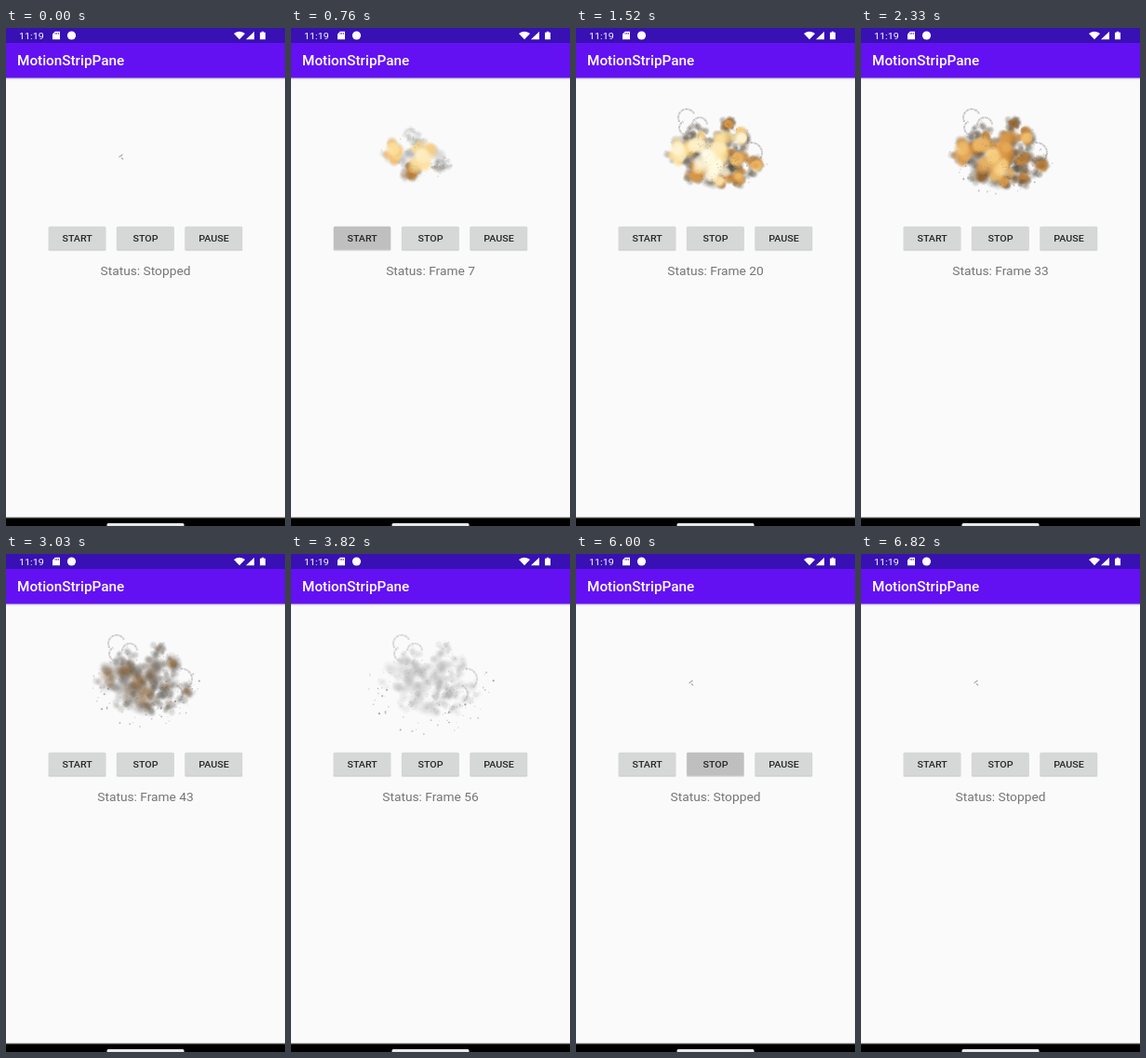
Recreate the animation shown at these times as an HTML page with a canvas. Size 300 px wide and 534 px high, loop 7.18 s.

```html
<!DOCTYPE html>
<html lang="en">
<head>
<meta charset="utf-8">
<title>Sprite demo</title>
<style>
  html, body { margin: 0; width: 100%; height: 100%; overflow: hidden; background: #fafafa; }
  svg, canvas { position: absolute; left: 0; top: 0; width: 300px; height: 534px; display: block; }
  canvas { height: 210px; }
  text { font-family: Roboto, Arial, sans-serif; }
  .clock { font-size: 9.8px; fill: #fff; }
  .title { font-size: 13.9px; font-weight: 500; fill: #fff; }
  .label { font-size: 9.7px; font-weight: 500; fill: #242424; text-anchor: middle; }
  .status { font-size: 12.5px; fill: #757575; text-anchor: middle; }
  .button rect { rx: 1.3px; }
</style>
</head>
<body>
<svg viewBox="0 0 300 534">
  <defs>
    <linearGradient id="shade" x2="0" y2="1">
      <stop offset="0" stop-color="#000" stop-opacity=".22"/>
      <stop offset="1" stop-color="#000" stop-opacity="0"/>
    </linearGradient>
  </defs>
  <rect width="300" height="534" fill="#fafafa"/>
  <rect y="53" width="300" height="3" fill="url(#shade)"/>
  <rect width="300" height="53.5" fill="#6311f3"/>
  <rect width="300" height="16" fill="#3810b4"/>

  <!-- the screen is slightly wider than its natural aspect -->
  <text class="clock" transform="translate(14 11.7) scale(1.1 1)">11:19</text>
  <text class="title" transform="translate(12 40.3) scale(1.1 1)">MotionStripPane</text>

  <g fill="#fff">
    <path d="M52.7 3.8H58V12.2H50V6.4Z"/>
    <circle cx="70.5" cy="8" r="4.6"/>
    <path d="M245 6Q251 1.6 257 6L251 12.3Z"/>
    <path d="M267 3.7V12.2H258Z"/>
    <path d="M273 4.7H274.8V3.7H277.2V4.7H279V12.3H273Z"/>
  </g>
  <path d="M53 5V6.8M54.7 5V6.8M56.4 5V6.8" stroke="#3810b4" stroke-width=".7"/>

  <g id="buttons"></g>
  <text id="status" class="status" transform="translate(150 265) scale(1.1 1)">Status: Stopped</text>

  <rect y="524" width="300" height="1.5" fill="#bdbdbd"/>
  <rect y="525.3" width="300" height="9" fill="#000"/>
  <rect x="108.5" y="531" width="83" height="4" rx="1.5" fill="#e8e8e8"/>
</svg>
<canvas></canvas>

<script>
const LOOP = 7180, START = 340, STOP = 5915;
const TIMELINE = [[START, 0], [745, 7], [1512, 20], [2322, 33], [3812, 56], [3942, 58.2]];

// label, left edge, press time, fade start, fade end
const BUTTONS = [
  ['START', 46, 210, 850, 1090],
  ['STOP', 119.3, 5150, 6450, 6810],
  ['PAUSE', 192.8, 3840, 4480, 4730]
];

// x, y, radius, birth, heat
const BLOBS = [
  [110, 132, 14, 0, .88], [142, 138, 18, 0, 1], [129, 155, 12, 1, .58],
  [130, 124, 15, 7, .85], [150, 151, 17, 7, 1], [158, 128, 16, 8, .85],
  [178, 118, 11, 9, .86], [165, 103, 8, 10, .5], [193, 147, 10, 10, .6],
  [175, 160, 10, 9, .6], [156, 163, 9, 8, .62], [172, 141, 12, 7, .62],
  [131, 112, 10, 2, .05], [160, 151, 8, 1, .15], [172, 145, 8, 2, 0]
];

// x, y, radius, first angle, sweep
const CURLS = [
  [119, 96, 9, 2.6, 3.2], [133, 104, 8, 3.2, 3], [189, 134, 11, 4.6, 2.6],
  [118, 107, 7, 1.8, 2.6], [181, 150, 9, 5, 2.4]
];

const HEAT = [[0, .7], [7, .93], [14, 1.1], [20, 1.1], [33, .76], [40, .5], [48, 0]];
const SMOKE = [[0, .1], [7, .2], [20, .4], [33, .36], [45, .24], [56, .13], [64, .07]];
const TONE = [[0, 115], [7, 112], [20, 72], [33, 74], [45, 95], [56, 122]];
const FIRE = [
  [0, [74, 62, 48]], [.3, [136, 90, 42]], [.52, [220, 150, 66]],
  [.76, [253, 218, 140]], [1, [255, 251, 228]]
];

const clamp = v => Math.max(0, Math.min(1, v));
const mix = (a, b, p) => a + (b - a) * p;

function segment(keys, v) {
  let i = 0;
  while (i < keys.length - 2 && v >= keys[i + 1][0]) i++;
  const [from, a] = keys[i], [to, b] = keys[i + 1];
  return [a, b, clamp((v - from) / (to - from))];
}
const at = (keys, v) => mix(...segment(keys, v));
function fireColor(heat) {
  const [a, b, p] = segment(FIRE, heat);
  return a.map((v, i) => Math.round(mix(v, b[i], p)));
}

let seed = 2417;
function rand(lo = 0, hi = 1) {
  seed = (seed * 16807) % 2147483647;
  return lo + (hi - lo) * seed / 2147483647;
}
const many = (n, make) => Array.from({ length: n }, make);

const puffs = (n, near, far, small, large) => BLOBS.flatMap(blob => many(n, () => ({
  blob, turn: rand(0, Math.PI * 2), dist: rand(near, far),
  size: rand(small, large), vary: rand(-1, 1)
})));
const smoke = puffs(14, .3, 1.08, .2, .45);
const flames = puffs(11, 0, .82, .28, .58)
  .filter(p => p.blob[4] > .1)
  .sort((a, b) => (a.blob[4] - a.dist * .4) - (b.blob[4] - b.dist * .4));
const specks = puffs(16, .2, 1.25, .4, .9);
const debris = many(50, () => ({
  turn: rand(-.25, 3.45), far: rand(.68, 1.12), size: rand(.4, 1.2), shade: rand(.2, .6)
}));

const canvas = document.querySelector('canvas');
const ctx = canvas.getContext('2d');
const dpr = window.devicePixelRatio || 1;
canvas.width = 300 * dpr;
canvas.height = 210 * dpr;
ctx.scale(dpr, dpr);

function soft(x, y, r, [red, green, blue], alpha, core = .35) {
  const g = ctx.createRadialGradient(x, y, 0, x, y, r);
  const rgb = `${red},${green},${blue}`;
  g.addColorStop(0, `rgba(${rgb},${alpha})`);
  g.addColorStop(core, `rgba(${rgb},${alpha * .85})`);
  g.addColorStop(1, `rgba(${rgb},0)`);
  ctx.fillStyle = g;
  ctx.fillRect(x - r, y - r, r * 2, r * 2);
}

function dot(x, y, r, tone, alpha) {
  ctx.fillStyle = `rgba(${tone},${tone},${tone},${alpha})`;
  ctx.beginPath();
  ctx.arc(x, y, r, 0, 7);
  ctx.fill();
}

function place(p, n) {
  const [bx, by, br, birth] = p.blob;
  const age = clamp((n - birth) / 9);
  const grow = 1 - (1 - age) ** 2;
  const spread = 1 + Math.max(0, n - 20) * .001;
  const cx = 150 + (mix(128, bx, Math.sqrt(grow)) - 150) * spread;
  const cy = 135 + (mix(138, by, Math.sqrt(grow)) - 135) * spread;
  const r = br * grow * spread;
  const turn = p.turn + n * .008 * p.vary;
  return {
    x: cx + Math.cos(turn) * r * p.dist,
    y: cy + Math.sin(turn) * r * p.dist,
    r, grow
  };
}

function drawSpot() {
  ctx.strokeStyle = 'rgba(110,110,110,.55)';
  ctx.lineWidth = 1.2;
  ctx.beginPath();
  ctx.moveTo(121.5, 138.5);
  ctx.lineTo(125.5, 135.5);
  ctx.moveTo(124, 139);
  ctx.lineTo(126, 141);
  ctx.stroke();
}

function drawDebris(n) {
  const p = Math.sqrt(clamp((n - 8) / 48));
  const show = clamp((n - 14) / 22);
  for (const d of debris) {
    const x = 150 + Math.cos(d.turn) * 62 * d.far * p;
    const y = 138 + Math.sin(d.turn) * 51 * d.far * p;
    dot(x, y, d.size, 105, d.shade * show);
  }
}

function drawCurls(n, tone) {
  const alpha = .3 * clamp((n - 7) / 10);
  ctx.lineWidth = 2;
  ctx.setLineDash([2.2, .7, 1.1, .5]);
  ctx.strokeStyle = `rgba(${tone},${tone},${tone},${alpha})`;
  for (const [x, y, r, from, sweep] of CURLS) {
    ctx.beginPath();
    ctx.arc(x, y, r, from, from + sweep);
    ctx.stroke();
  }
  ctx.setLineDash([]);
}

function drawBlast(n) {
  ctx.clearRect(0, 0, 300, 210);
  if (n < 1) return drawSpot();

  const tone = at(TONE, n), density = at(SMOKE, n), heat = at(HEAT, n);
  const warm = clamp(heat) * clamp((n - 6) / 10);
  drawDebris(n);
  drawCurls(n, tone);

  for (const p of smoke) {
    const { x, y, r, grow } = place(p, n);
    if (!grow) continue;
    const c = tone + p.vary * 16;
    const rgb = [c + warm * 12, c + warm * 2, c - warm * 14].map(Math.round);
    const thick = 1.35 - Math.hypot(x - 152, y - 130) / 75;
    soft(x, y, r * p.size + 1.2, rgb, density * thick * grow, .4);
  }

  if (heat > 0) for (const p of flames) {
    const { x, y, r, grow } = place(p, n);
    const h = heat * p.blob[4] - p.dist * .3 + p.vary * .1;
    if (!grow || h < .05) continue;
    const alpha = clamp(h * 2) * .8 * grow * clamp(heat * 2);
    soft(x, y, r * p.size + 1, fireColor(h), alpha, .5);
  }

  const grain = mix(.26, .18, clamp((n - 20) / 36));
  for (const p of specks) {
    const { x, y, grow } = place(p, n);
    if (!grow || (p.dist < .75 && heat * p.blob[4] > .55)) continue;
    dot(x, y, p.size * .9, Math.round(tone * .8), grain * grow);
  }
}

const overlays = [];
document.getElementById('buttons').innerHTML = BUTTONS.map(([label, x]) => `
  <g class="button">
    <rect x="${x - .7}" y="213.2" width="62.4" height="26" fill="#000" opacity=".07"/>
    <rect x="${x - .2}" y="213" width="61.4" height="25.5" fill="#000" opacity=".12"/>
    <rect x="${x}" y="212.8" width="61" height="24.8" fill="#d6d7d7"/>
    <rect class="press" x="${x}" y="212.8" width="61" height="24.8" fill="#000" opacity="0"/>
    <text class="label" transform="translate(${x + 30.7} 228.8) scale(1.1 1)">${label}</text>
  </g>`).join('');
overlays.push(...document.querySelectorAll('.press'));

const status = document.getElementById('status');
let shown = -1, words = '';

function render(now) {
  const t = now % LOOP;
  const running = t >= START && t < STOP;
  const n = running ? Math.floor(at(TIMELINE, t)) : 0;
  if (n !== shown) drawBlast(shown = n);

  const next = 'Status: ' + (running ? 'Frame ' + n : 'Stopped');
  if (next !== words) status.textContent = words = next;

  BUTTONS.forEach(([, , press, fade, end], i) => {
    const level = clamp((t - press) / 250) * (1 - clamp((t - fade) / (end - fade)));
    overlays[i].setAttribute('opacity', (level * .11).toFixed(3));
  });
}

function tick() {
  render(performance.now());
  requestAnimationFrame(tick);
}
tick();
</script>
</body>
</html>
```
